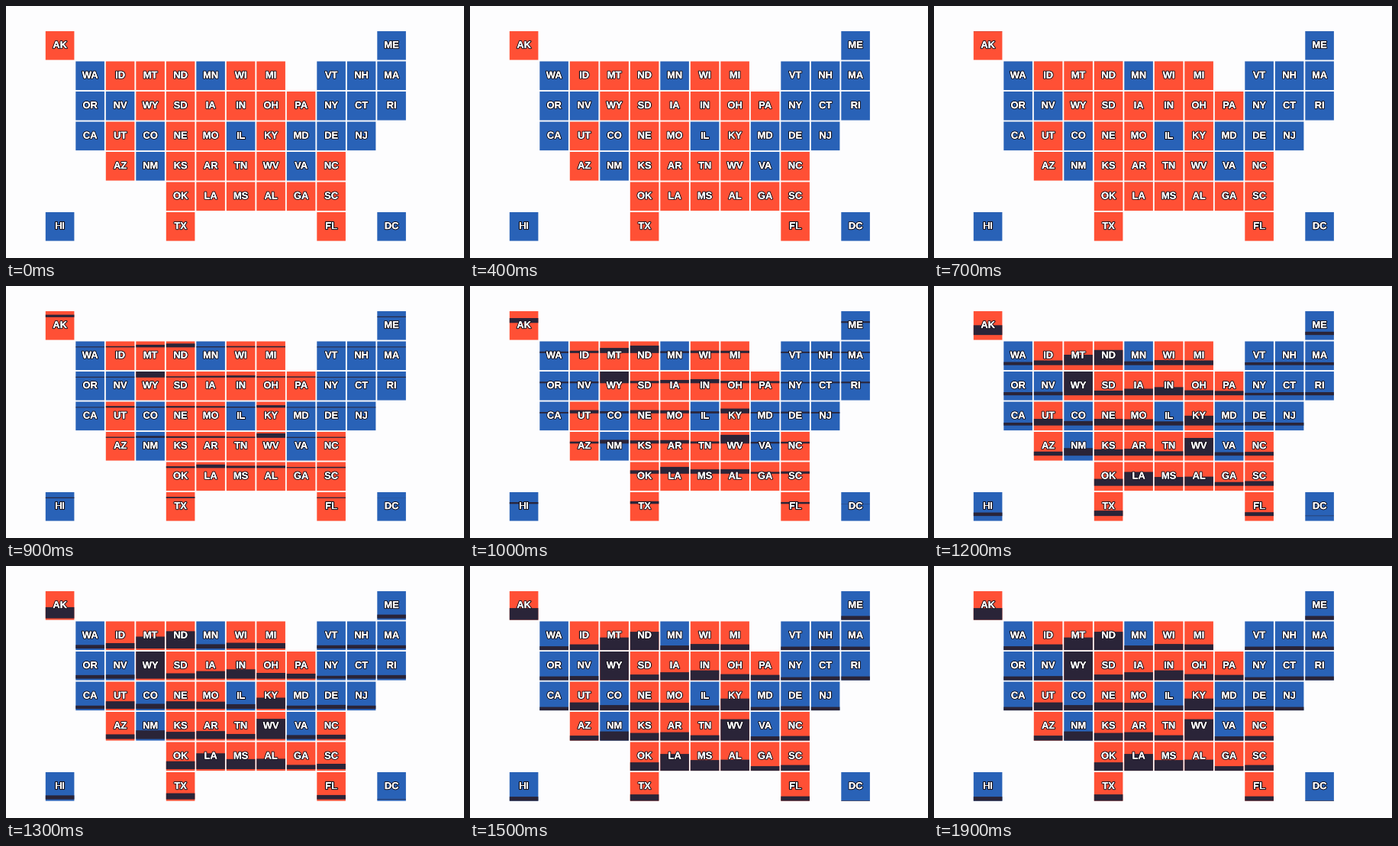
Write a matplotlib script that moves like this. It is 600 px wide and 330 px high and loops after 2 s.

```python
import matplotlib.pyplot as plt
from matplotlib.animation import FuncAnimation
from matplotlib.patches import Rectangle
from matplotlib.patheffects import Normal, SimpleLineShadow, withStroke

W, H, DPI = 600, 330, 100
FRAMES, STEP = 20, 100
BG, RED, BLUE, DARK = "#fdfdfe", "#ff5035", "#2962b7", "#2a2438"
LEFT, TOP, PITCH, SIZE = 51.8, 33, 39.5, 37.6
START, LENGTH = 648, 780  # ms

# Each row: (first column, "state:bar height ..." in px for neighbouring tiles)
ROWS = [
    [(0, "AK:15.5"), (11, "ME:5.2")],
    [(1, "WA:5 ID:7.5 MT:16.5 ND:24 MN:6 WI:8 MI:7.5"),
     (9, "VT:4.5 NH:5 MA:4.5")],
    [(1, "OR:5 NV:5.5 WY:37.6 SD:7.5 IA:10.5 IN:13 OH:8 PA:7 NY:4 CT:5 RI:5")],
    [(1, "CA:4.5 UT:10.5 CO:7 NE:10.5 MO:10 IL:6.5 KY:15.5 MD:4.5 DE:5.5 NJ:4.5")],
    [(2, "AZ:6.5 NM:12 KS:10 AR:11 TN:7 WV:28 VA:5.5 NC:6")],
    [(4, "OK:11 LA:22 MS:14 AL:14.5 GA:6 SC:7.5")],
    [(0, "HI:5.5"), (4, "TX:8.5"), (9, "FL:6"), (11, "DC:0.6")],
]
BLUE_STATES = set(
    "WA OR CA NV CO NM MN IL VA MD DE NJ NY CT RI VT NH MA ME HI DC".split())

fig = plt.figure(figsize=(W / DPI, H / DPI), dpi=DPI, facecolor=BG)
ax = fig.add_axes([0, 0, 1, 1])
ax.set_xlim(0, W)
ax.set_ylim(H, 0)
ax.axis("off")


def px(n):
    """Pixels to points."""
    return n * 72 / DPI


def box(x, y, h, color, z):
    return ax.add_patch(Rectangle((x, y), SIZE, h, fc=color, lw=0,
                                  snap=False, zorder=z))


def label(x, y, name):
    ax.text(x, y, name, color="white", size=px(12.9), weight="bold",
            family="Liberation Sans", ha="center", va="baseline", zorder=3,
            path_effects=[
                withStroke(linewidth=px(2.2), foreground="#15121c"),
                Normal()])


bars = []
for r, groups in enumerate(ROWS):
    y = TOP + r * PITCH
    for first, items in groups:
        for c, item in enumerate(items.split(), first):
            name, height = item.split(":")
            x = LEFT + c * PITCH
            box(x, y, SIZE, BLUE if name in BLUE_STATES else RED, 1)
            bars.append((box(x, y, 0, DARK, 2), y, float(height)))
            label(x + SIZE / 2, y + 22.1, name)


def ease(p):
    p = min(max(p, 0), 1)
    return 2 * p * p if p < 0.5 else 1 - 2 * (1 - p) ** 2


def update(frame):
    # Bars stretch down from the top edge of their tile
    s = ease((frame * STEP - START) / LENGTH)
    for bar, y, height in bars:
        bar.set_y(y + s * (SIZE - height))
        bar.set_height(s * height)
        bar.set_visible(s > 0)
    return [b[0] for b in bars]


anim = FuncAnimation(fig, update, frames=FRAMES, interval=STEP,
                     repeat=True, repeat_delay=0, blit=False)
plt.show()
```
